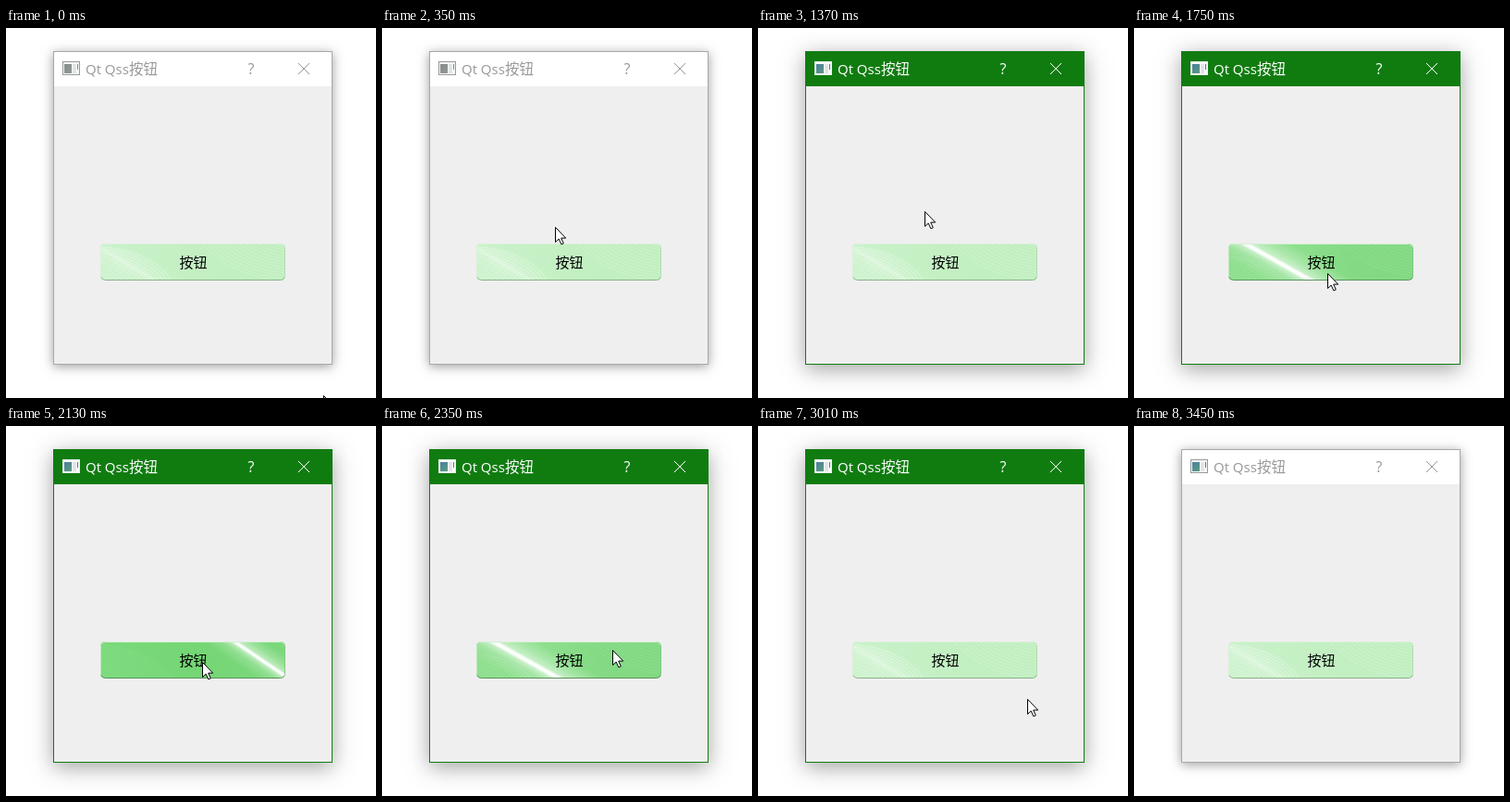
Animation, 400 px wide and 400 px high, one loop 3.53 s. Source, as an HTML page with a canvas:

```html
<!DOCTYPE html>
<html lang="zh">
<head>
<meta charset="utf-8">
<title>Qt Qss按钮</title>
<style>
html, body { margin: 0; width: 100%; height: 100%; overflow: hidden; background: #fff; }
canvas { display: block; width: 400px; height: 400px; }
</style>
</head>
<body>
<canvas id="stage" width="400" height="400"></canvas>
<script>
const ctx = document.getElementById('stage').getContext('2d');
const LOOP = 3530;
const TICK = 73; // pointer sampling interval
const BTN = { x: 102, y: 233, w: 200, h: 40 };
const CJK = '"Noto Sans CJK SC", "Noto Sans CJK", sans-serif';
const LATIN = '"Open Sans", "Noto Sans", sans-serif';

const START = { x: 343, y: 397 };
// Each leg moves the pointer to (x, y) between its first and last sample.
const LEGS = [
  { from: 60, to: 350, x: 187, y: 215 },
  { from: 490, to: 639, x: 200, y: 246 },
  { from: 713, to: 1010, x: 185, y: 68, ease: 1.4 },
  { from: 1090, to: 1090, x: 184, y: 46 },
  { from: 1310, to: 1370, x: 180, y: 198 },
  { from: 1450, to: 1670, x: 207, y: 270 },
  { from: 1750, to: 1890, x: 212, y: 255 },
  { from: 2270, to: 2350, x: 249, y: 242 },
  { from: 2790, to: 3310, x: 400, y: 430, ease: 1.3 }
];
const PRESSES = [[2130, 2190], [2490, 2630]];
const ACTIVE = [1150, 3450];

const within = (t, [a, b]) => t >= a && t < b;

function pointerAt(t) {
  let { x, y } = START;
  for (const leg of LEGS) {
    if (t < leg.from) break;
    const span = leg.to - leg.from;
    const gaps = Math.round(span / TICK);
    const done = t >= leg.to ? gaps : Math.floor((t - leg.from) / span * gaps);
    const p = ((done + 1) / (gaps + 1)) ** (leg.ease || 1);
    x += (leg.x - x) * p;
    y += (leg.y - y) * p;
  }
  return { x: Math.round(x), y: Math.round(y) };
}

function buttonState(t, p) {
  if (PRESSES.some(span => within(t, span))) return 'pressed';
  const over = p.x >= BTN.x && p.x < BTN.x + BTN.w && p.y >= BTN.y && p.y < BTN.y + BTN.h;
  return over ? 'hover' : 'normal';
}

function rect(x, y, w, h, fill) {
  ctx.fillStyle = fill;
  ctx.fillRect(x, y, w, h);
}

function line(color, x0, y0, x1, y1) {
  ctx.strokeStyle = color;
  ctx.lineWidth = 1;
  ctx.beginPath();
  ctx.moveTo(x0, y0);
  ctx.lineTo(x1, y1);
  ctx.stroke();
}

function label(text, x, y, font, color) {
  ctx.font = font;
  ctx.fillStyle = color;
  ctx.fillText(text, x, y);
}

function gradient(x0, y0, x1, y1, stops) {
  const g = ctx.createLinearGradient(x0, y0, x1, y1);
  stops.forEach(([at, color]) => g.addColorStop(at, color));
  return g;
}

const white = alpha => `rgba(255,255,255,${alpha})`;

function drawIcon(active, tinted) {
  rect(61, 36, 19, 15, active ? '#e8eeee' : '#96999b');
  rect(62, 37, 17, 13, '#f7f8f8');
  const [dark, light] = tinted ? ['#4a7fa0', '#5c9a80'] : ['#858b8d', '#929a94'];
  rect(63, 39, 8, 10, gradient(63, 39, 71, 49, [[0, dark], [1, light]]));
  rect(72, 39, 4, 10, '#e2e5e5');
  rect(77, 39, 1, 6, dark);
}

function drawWindow(active, tinted) {
  const ink = active ? '#ffffff' : '#999999';
  ctx.save();
  ctx.shadowColor = active ? 'rgba(0,0,0,.36)' : 'rgba(0,0,0,.38)';
  ctx.shadowBlur = active ? 22 : 11;
  ctx.shadowOffsetY = active ? 5 : 2;
  rect(51, 25, 302, 339, active ? '#107c10' : '#a8a8a8');
  ctx.restore();
  rect(52, 26, 300, 37, active ? '#107c10' : '#ffffff');
  rect(52, 63, 300, 300, '#efefef');

  drawIcon(active, tinted);
  label('Qt Qss', 86, 50, '15px ' + LATIN, ink);
  label('按钮', 133, 50, '15.5px ' + CJK, ink);
  label('?', 261.5, 50, '16px ' + LATIN, ink);
  line(ink, 316, 38, 328, 50);
  line(ink, 328, 38, 316, 50);
}

// Fine concentric curves left by the gradient.
function ripples(cx, cy, radius, count, step, alpha) {
  ctx.strokeStyle = white(alpha);
  ctx.lineWidth = 0.8;
  for (let i = 0; i < count; i++) {
    const r = radius + i * step;
    ctx.beginPath();
    ctx.ellipse(cx, cy, r * 1.6, r, 0, 0, Math.PI * 2);
    ctx.stroke();
  }
}

// Bright diagonal band through (x, y) with the given slope.
function streak(x, y, slope, glow) {
  const len = Math.hypot(1, slope);
  const nx = slope / len * glow, ny = -glow / len;
  rect(BTN.x, BTN.y, BTN.w, BTN.h, gradient(x - nx, y - ny, x + nx, y + ny, [
    [0, white(0)], [0.3, white(0.2)], [0.43, white(0.5)], [0.48, white(0.97)],
    [0.53, white(0.97)], [0.58, white(0.5)], [0.75, white(0.24)], [1, white(0)]
  ]));
}

function drawFace(state) {
  const { x, y, w, h } = BTN;
  const fill = colors => rect(x, y, w, h, gradient(x, y + h, x + w, y,
    colors.map((c, i) => [i / (colors.length - 1), c])));
  if (state === 'normal') {
    fill(['#d2f4d2', '#c6f0c6', '#c2efc2', '#bbedbb', '#b5eab5']);
    streak(142, 262, 0.6, 20);
    rect(x, y, w, h, gradient(x, y, x + 70, y + 38, [
      [0, 'rgba(190,238,190,.6)'], [0.5, 'rgba(200,241,200,.65)'], [1, 'rgba(196,240,196,.7)']
    ]));
    ripples(95, 292, 18, 16, 2.5, 0.45);
    ripples(320, 200, 36, 14, 3, 0.25);
  } else if (state === 'hover') {
    fill(['#8add8a', '#8fe08f', '#84da84', '#82d982']);
    ripples(95, 292, 18, 12, 2.5, 0.18);
    ripples(320, 200, 36, 12, 3, 0.1);
    streak(157, 254, 0.56, 24);
  } else {
    fill(['#7bda7b', '#75d675', '#7bd87b']);
    ripples(95, 292, 18, 16, 2.5, 0.1);
    streak(276, 253, 0.68, 19);
  }
}

function drawButton(state) {
  const { x, y, w, h } = BTN;
  const outline = inset => {
    ctx.beginPath();
    ctx.roundRect(x + inset, y + inset, w - inset * 2, h - inset * 2, 5);
  };
  ctx.save();
  outline(0);
  ctx.clip();
  drawFace(state);
  outline(0.5);
  const [side, base] = state === 'normal' ? ['#b0dfb0', '#8bb08b'] : ['#80c880', '#5b935b'];
  ctx.strokeStyle = gradient(0, y, 0, y + h, [
    [0, '#dcf4dc'], [0.15, side], [0.88, side], [0.95, base], [1, base]
  ]);
  ctx.lineWidth = 1;
  ctx.stroke();
  rect(x, y + 4, 1, h - 8, white(0.5));
  ctx.restore();
  label('按钮', 187.5, 259, '15px ' + CJK, '#000');
}

function drawPointer({ x, y }) {
  const shape = [[0, 0], [0, 16], [3.7, 12.6], [6.4, 18.4], [8.8, 17.3], [6.2, 11.6], [11.2, 11.6]];
  ctx.beginPath();
  shape.forEach(([dx, dy]) => ctx.lineTo(x + 0.5 + dx, y + 0.5 + dy));
  ctx.closePath();
  ctx.fillStyle = '#fff';
  ctx.fill();
  ctx.strokeStyle = '#000';
  ctx.lineWidth = 1;
  ctx.stroke();
}

function draw(t) {
  const pointer = pointerAt(t);
  rect(0, 0, 400, 400, '#fff');
  drawWindow(within(t, ACTIVE), t >= ACTIVE[0]);
  drawButton(buttonState(t, pointer));
  drawPointer(pointer);
}

function tick() {
  draw(performance.now() % LOOP);
  requestAnimationFrame(tick);
}
tick();
</script>
</body>
</html>
```
